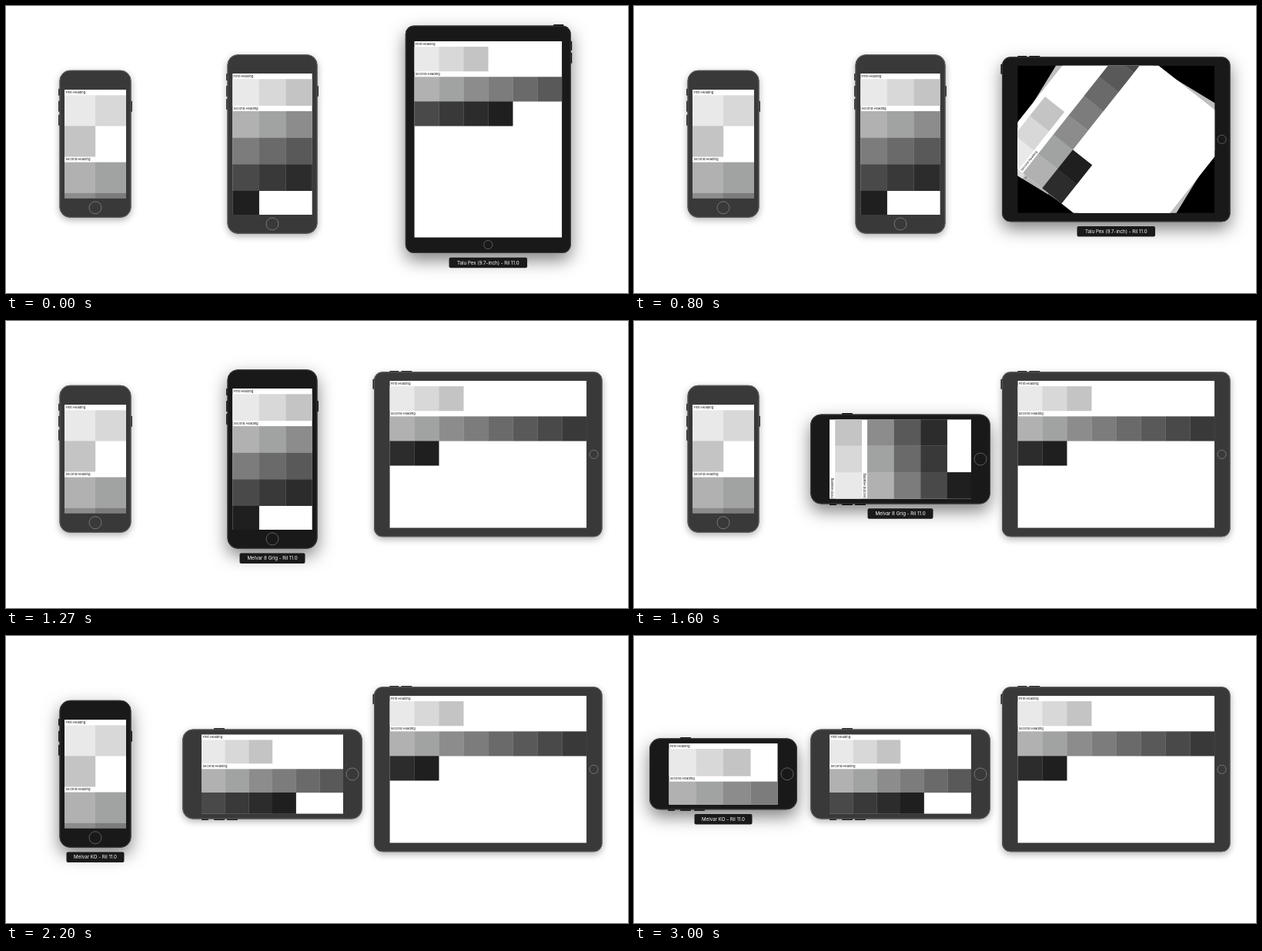
Write an HTML page with a canvas that moves like this. It is 808 px wide and 374 px high and loops after 3870 ms.

```html
<!DOCTYPE html>
<html lang="en">
<head>
<meta charset="utf-8">
<title>Rotating grid layouts</title>
<style>
  html, body { margin: 0; width: 100%; height: 100%; overflow: hidden; background: #fff; }
  canvas { display: block; }
</style>
</head>
<body>
<canvas id="stage" width="808" height="374"></canvas>
<script>
const ctx = document.getElementById('stage').getContext('2d');
const LOOP = 3870, STEP = 1000 / 15;
const HEADING = 7.25;
const SECTIONS = [
  { title: 'First Heading', shades: ['#e9e9e9', '#d8d8d8', '#c4c4c4'] },
  { title: 'Second Heading', shades: ['#b1b1b1', '#a0a3a2', '#8c8c8c', '#7c7c7c', '#6a6a6a',
                                      '#595959', '#494949', '#393939', '#2c2c2c', '#1f1f1f'] }
];

// Sizes are for portrait; buttons are [side, start, length] relative to the centre.
const phoneButtons = [['left', -92, 9], ['left', -76, 14], ['left', -59, 14], ['right', -76, 14]];
const devices = [
  { label: 'Melvar KO - Ril 11.0', labelWidth: 75, x: 116, y: 179.8, w: 93, h: 192, radius: 14,
    screenW: 80, screenH: 141.5, columns: [2, 4], home: [83, 8],
    buttons: phoneButtons.map(([side, start, size]) => [side, start + 20 * (start < -90), size]),
    active: [2200, LOOP], turn: 2670, spin: 2685, duration: 300 },
  { label: 'Melvar 8 Grig - Ril 11.0', labelWidth: 85, x: 346, y: 180, w: 117, h: 233.5, radius: 14,
    screenW: 103.7, screenH: 184, columns: [3, 6], home: [104, 8], buttons: phoneButtons,
    active: [1270, 2200], turn: 1600, spin: 1652, duration: 330 },
  { label: 'Talu Pex (9.7-inch) - Ril 11.0', labelWidth: 101.5, x: 626.3, y: 173.8, w: 215, h: 296.5, radius: 11,
    screenW: 192, screenH: 256, columns: [6, 8], home: [137.3, 5.6],
    buttons: [['right', -128, 12], ['right', -113, 14], ['top', 85, 13]],
    active: [0, 1270], turn: 600, spin: 619, duration: 400, trail: 20 }
];
devices[0].buttons[0][1] = -72;
devices[0].buttons[0][2] = 9;
devices[0].buttons = [['left', -72, 9], ['left', -56, 14], ['left', -38, 14], ['right', -56, 14]];

const mix = (a, b, p) => a + (b - a) * p;

function progress(d, t) {
  const p = Math.min(1, Math.max(0, (t - d.spin) / d.duration));
  return (1 - Math.cos(Math.PI * p)) / 2;
}

function roundBox(x, y, w, h, r) {
  ctx.beginPath();
  ctx.roundRect(x, y, w, h, r);
}

function drawGrid(left, top, cell, columns) {
  ctx.font = '4.1px Inter, Arial, sans-serif';
  ctx.textAlign = 'left';
  ctx.textBaseline = 'alphabetic';
  let y = top;
  for (const { title, shades } of SECTIONS) {
    ctx.fillStyle = '#111';
    ctx.fillText(title, left + 1.4, y + 5);
    y += HEADING;
    shades.forEach((shade, i) => {
      ctx.fillStyle = shade;
      ctx.fillRect(left + (i % columns) * cell, y + Math.floor(i / columns) * cell, cell + .2, cell + .2);
    });
    y += Math.ceil(shades.length / columns) * cell;
  }
}

// The view's bounds and angle move together; cells stay pinned to its top left.
function drawView(d, p, alpha) {
  const w = mix(d.screenW, d.screenH, p), h = mix(d.screenH, d.screenW, p);
  const layout = (columns, width, opacity) => {
    ctx.globalAlpha = opacity;
    drawGrid(-w / 2, -h / 2, width / columns, columns);
  };
  ctx.save();
  ctx.rotate(-Math.PI / 2 * (1 - p));
  ctx.globalAlpha = alpha;
  ctx.fillStyle = '#fff';
  ctx.fillRect(-w / 2, -h / 2, w, h);
  const old = Math.max(0, 1 - p * 5);
  if (old < 1) layout(d.columns[1], d.screenH, alpha);
  if (old > 0) layout(d.columns[0], d.screenW, alpha * old);
  ctx.restore();
}

function drawBody(d, active) {
  const { w, h } = d, color = active ? '#191919' : '#393939';
  ctx.fillStyle = active ? '#111' : '#2b2b2b';
  for (const [side, start, size] of d.buttons) {
    if (side === 'top') roundBox(start, -h / 2 - 1.6, size, 3, .6);
    else roundBox(side === 'left' ? -w / 2 - 1.4 : w / 2 - 1.6, start, 3, size, .6);
    ctx.fill();
  }
  ctx.save();
  ctx.shadowColor = active ? 'rgba(0,0,0,.5)' : 'rgba(0,0,0,.32)';
  ctx.shadowBlur = active ? 22 : 10;
  ctx.shadowOffsetY = active ? 9 : 3;
  ctx.fillStyle = color;
  roundBox(-w / 2, -h / 2, w, h, d.radius);
  ctx.fill();
  ctx.restore();
  ctx.strokeStyle = active ? '#3c3c3c' : '#5c5c5c';
  ctx.lineWidth = 1;
  roundBox(-w / 2 + .5, -h / 2 + .5, w - 1, h - 1, d.radius - .5);
  ctx.stroke();
  ctx.strokeStyle = active ? '#6c6c6c' : '#858585';
  ctx.lineWidth = .8;
  ctx.beginPath();
  ctx.arc(0, d.home[0], d.home[1], 0, Math.PI * 2);
  ctx.stroke();
}

function drawLabel(d, turned) {
  const top = d.y + (turned ? d.w : d.h) / 2 + 5.8;
  ctx.fillStyle = '#1a1a1a';
  roundBox(d.x - d.labelWidth / 2, top, d.labelWidth, 13.5, 2);
  ctx.fill();
  ctx.fillStyle = '#fff';
  ctx.font = '6.2px Inter, Arial, sans-serif';
  ctx.textAlign = 'center';
  ctx.textBaseline = 'middle';
  ctx.fillText(d.label, d.x, top + 7);
}

function drawDevice(d, t, clock) {
  const turned = clock >= d.turn;
  const active = clock >= d.active[0] && clock < d.active[1];
  ctx.save();
  ctx.translate(d.x, d.y);
  ctx.save();
  if (turned) ctx.rotate(-Math.PI / 2);
  drawBody(d, active);
  ctx.restore();

  const w = turned ? d.screenH : d.screenW, h = turned ? d.screenW : d.screenH;
  ctx.beginPath();
  ctx.rect(-w / 2, -h / 2, w, h);
  ctx.clip();
  ctx.fillStyle = '#000';
  ctx.fillRect(-w / 2, -h / 2, w, h);
  if (!turned) {
    ctx.fillStyle = '#fff';
    ctx.fillRect(-w / 2, -h / 2, w, h);
    drawGrid(-w / 2, -h / 2, w / d.columns[0], d.columns[0]);
  } else {
    const p = progress(d, t);
    if (d.trail && p > 0 && p < 1) drawView(d, progress(d, t - d.trail), .75);
    drawView(d, p, 1);
  }
  ctx.restore();
  if (active) drawLabel(d, turned);
}

function render() {
  const clock = performance.now() % LOOP;
  const t = Math.floor((clock + 4) / STEP) * STEP;
  ctx.fillStyle = '#fff';
  ctx.fillRect(0, 0, 808, 374);
  for (const d of devices) drawDevice(d, t, clock);
  requestAnimationFrame(render);
}
render();
</script>
</body>
</html>
```
